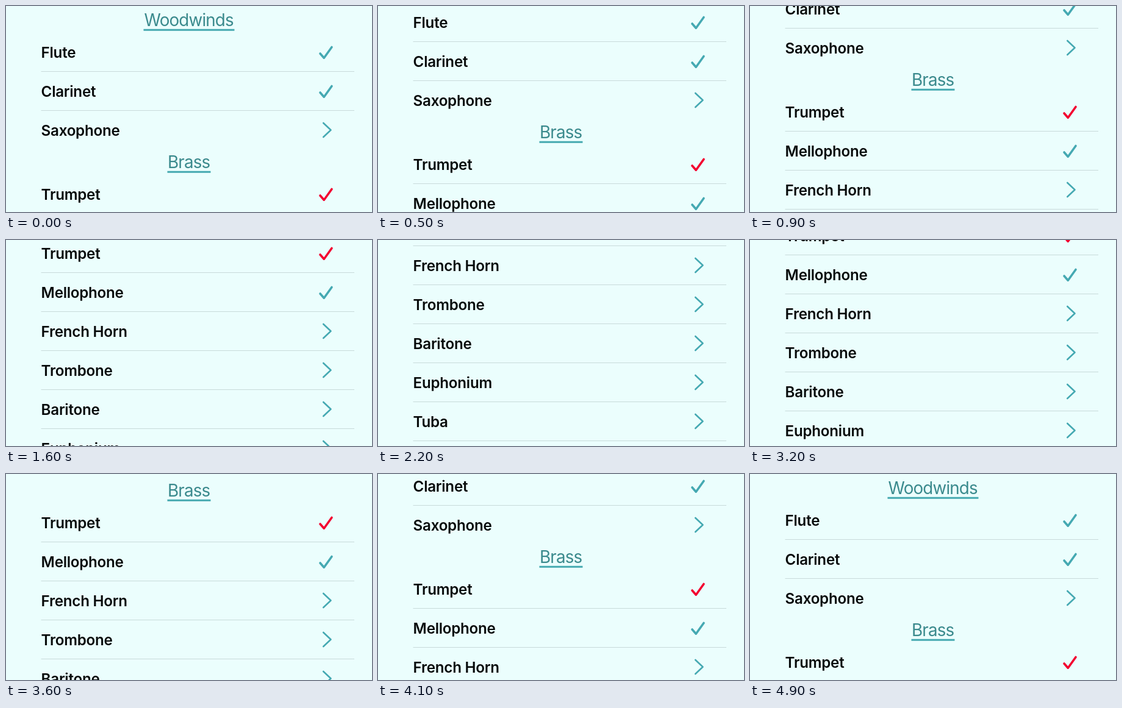
An HTML page that plays this animation: 600x338 px, repeating every 5 s.

```html
<!DOCTYPE html>
<html lang="en">
<head>
<meta charset="utf-8">
<title>Instruments</title>
<style>
  html, body { margin: 0; width: 100%; height: 100%; overflow: hidden; background: #ebfefd; }
  svg { display: block; width: 100vw; height: 100vh; }
  text { font-family: Inter, "Open Sans", sans-serif; }
  .item { font-size: 24.2px; font-weight: 600; letter-spacing: -.27px; fill: #070a0a; }
  .head { font-size: 27.8px; font-weight: 400; letter-spacing: -.85px; fill: #3b8a8d; text-anchor: middle; }
  .rule { stroke: #c8dada; stroke-width: 1; }
  .under { stroke: #45a9b0; stroke-width: 3; }
  .check, .more { fill: none; stroke: #45a9b2; stroke-linecap: round; stroke-linejoin: round; }
  .check { stroke-width: 3.6; }
  .more { stroke-width: 2.6; }
  .red { stroke: #f3002f; }
</style>
</head>
<body>
<svg viewBox="0 0 600 338"><g id="list"></g></svg>
<script>
  const list = document.getElementById('list');

  function add(tag, cls, attrs, label) {
    const el = document.createElementNS('http://www.w3.org/2000/svg', tag);
    el.setAttribute('class', cls);
    for (const key in attrs) el.setAttribute(key, attrs[key]);
    if (label) el.textContent = label;
    list.append(el);
  }

  function line(cls, x1, x2, y) {
    add('line', cls, { x1, x2, y1: y, y2: y });
  }

  function header(label, y, half) {
    add('text', 'head', { x: 299.7, y: y + 10 }, label);
    line('under', 300 - half, 300 + half, y + 16.2);
  }

  function row(label, y, mark, ruled) {
    add('text', 'item', { x: 57.6, y: y + 9 }, label);
    const d = mark === 'more'
      ? `M520.3 ${y - 12}L532.5 ${y - .5}L520.3 ${y + 11}`
      : `M515 ${y + 2}L521.3 ${y + 9.2}L534 ${y - 8.5}`;
    add('path', mark, { d });
    if (ruled) line('rule', 57.5, 571, y + 31.5);
  }

  header('Woodwinds', 23, 74.5);
  row('Flute', 76, 'check', true);
  row('Clarinet', 140, 'check', true);
  row('Saxophone', 204, 'more', false);

  header('Brass', 256, 35.5);
  ['Trumpet', 'Mellophone', 'French Horn', 'Trombone', 'Baritone', 'Euphonium', 'Tuba']
    .forEach((name, i) => row(name, 309 + i * 64, ['check red', 'check'][i] || 'more', true));

  const LOOP = 5000, HALF = LOOP / 2, STEP = 100;
  const RAMP = 624, LEAD = 34, REACH = 408;
  const speed = REACH / (HALF - RAMP);

  // Constant speed with an even ramp at both ends of the swing.
  function glide(t) {
    if (t > HALF / 2) return REACH - glide(HALF - t);
    return t < RAMP ? speed * t * t / (2 * RAMP) : speed * (t - RAMP / 2);
  }

  // The list scrolls in whole pixels.
  function scrollAt(ms) {
    const t = (Math.floor(ms / STEP) * STEP + LEAD) % LOOP;
    return Math.floor(glide(t < HALF ? t : LOOP - t));
  }

  const start = performance.now();
  function draw() {
    const ms = Math.max(0, performance.now() - start);
    list.setAttribute('transform', `translate(0 ${-scrollAt(ms)})`);
    requestAnimationFrame(draw);
  }
  draw();
</script>
</body>
</html>
```
